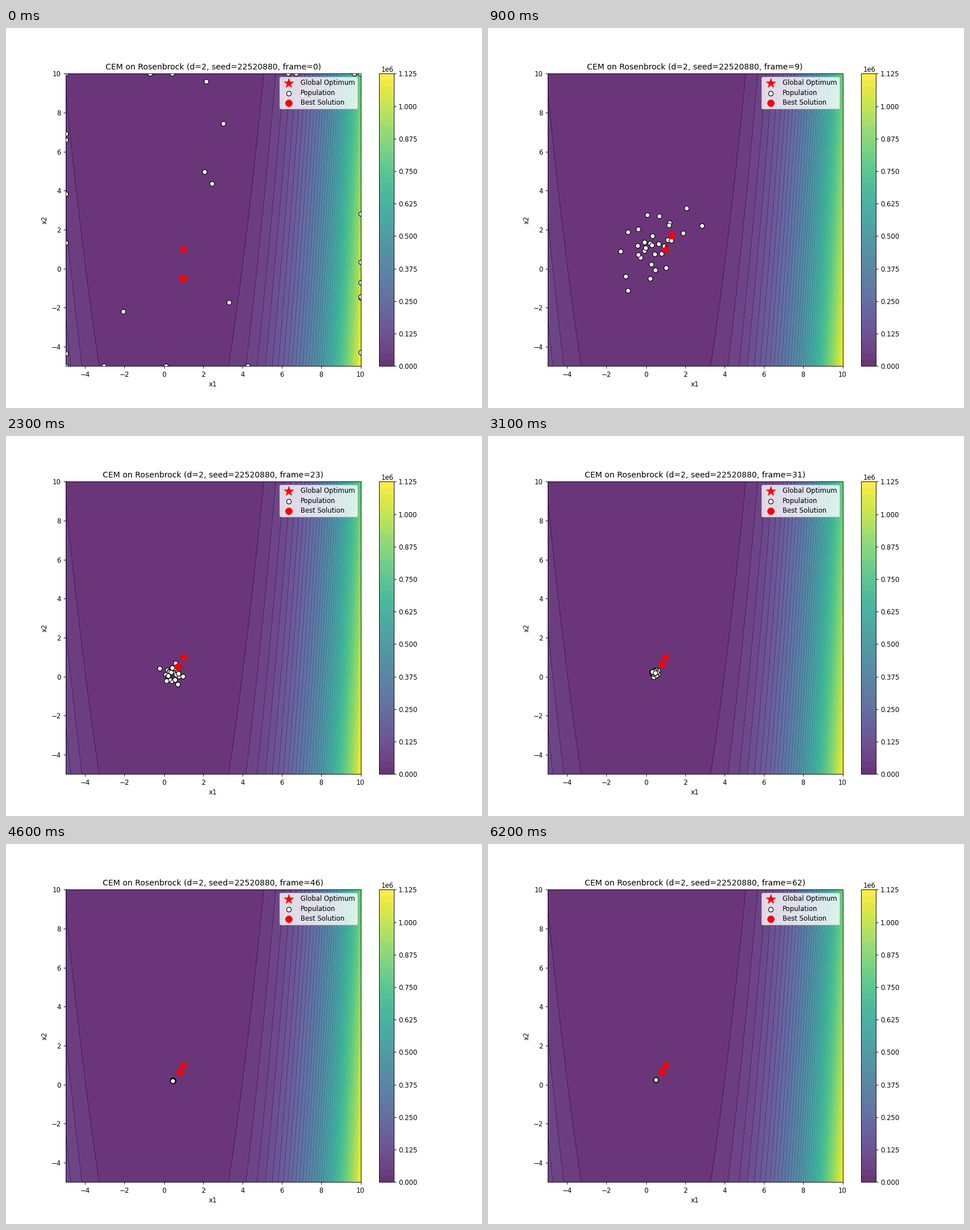
Recreate the animation shown at these times as a matplotlib script. Size 837x669 px, loop 6.3 s.

```python
import numpy as np
import matplotlib.pyplot as plt
from matplotlib.animation import FuncAnimation

DPI = 83.7
FRAMES = 63
LOW, HIGH = -5, 10
SIZE = 31

# Sampling distribution at a few generations: (generation, mean x, mean y, spread)
STAGES = [
    (0, 0.0, 4.0, 9.0),
    (9, 0.2, 1.0, 1.2),
    (15, 0.1, 0.6, 0.65),
    (23, 0.36, 0.2, 0.27),
    (31, 0.42, 0.18, 0.09),
    (62, 0.5, 0.25, 0.0004),
]

# Generation from which each best solution holds
BEST = {0: (0.96, -0.51), 6: (1.31, 1.71), 12: (0.715, 0.525), 27: (0.81, 0.67)}

plt.rcParams["font.family"] = "DejaVu Sans"


def rosenbrock(x, y):
    return 100 * (y - x**2) ** 2 + (1 - x) ** 2


def population(gen):
    """Gaussian cloud that drifts and shrinks, kept inside the search box."""
    gens, mean_x, mean_y, spread = np.transpose(STAGES)
    mean = np.interp(gen, gens, mean_x), np.interp(gen, gens, mean_y)
    std = np.exp(np.interp(gen, gens, np.log(spread)))
    noise = np.random.default_rng(100 + gen).standard_normal((SIZE, 2))
    return np.clip(mean + std * np.clip(noise, -2.2, 2.2), LOW, HIGH)


def best(gen):
    return BEST[max(g for g in BEST if g <= gen)]


# The tiny surplus keeps the pixel height from rounding down
fig, ax = plt.subplots(figsize=(10, 669.001 / DPI), dpi=DPI)

axis = np.linspace(LOW, HIGH, 200)
X, Y = np.meshgrid(axis, axis)
surface = ax.contourf(X, Y, rosenbrock(X, Y), levels=50, cmap="viridis", alpha=0.8)
fig.colorbar(surface, ax=ax)

ax.scatter(1, 1, c="red", marker="*", s=200, zorder=4, label="Global Optimum")
swarm = ax.scatter([], [], c="white", edgecolors="black", s=50, label="Population")
leader = ax.scatter([], [], c="red", s=100, zorder=2, label="Best Solution")
ax.set(xlim=(LOW, HIGH), ylim=(LOW, HIGH), xlabel="x1", ylabel="x2")
title = ax.set_title("")
ax.legend(loc="upper right", labelspacing=0.39, borderpad=0.35)


def draw(gen):
    swarm.set_offsets(population(gen))
    leader.set_offsets([best(gen)])
    title.set_text(f"CEM on Rosenbrock (d=2, seed=22520880, frame={gen})")
    return swarm, leader, title


anim = FuncAnimation(fig, draw, frames=FRAMES, interval=100, repeat=True)
plt.show()
```
